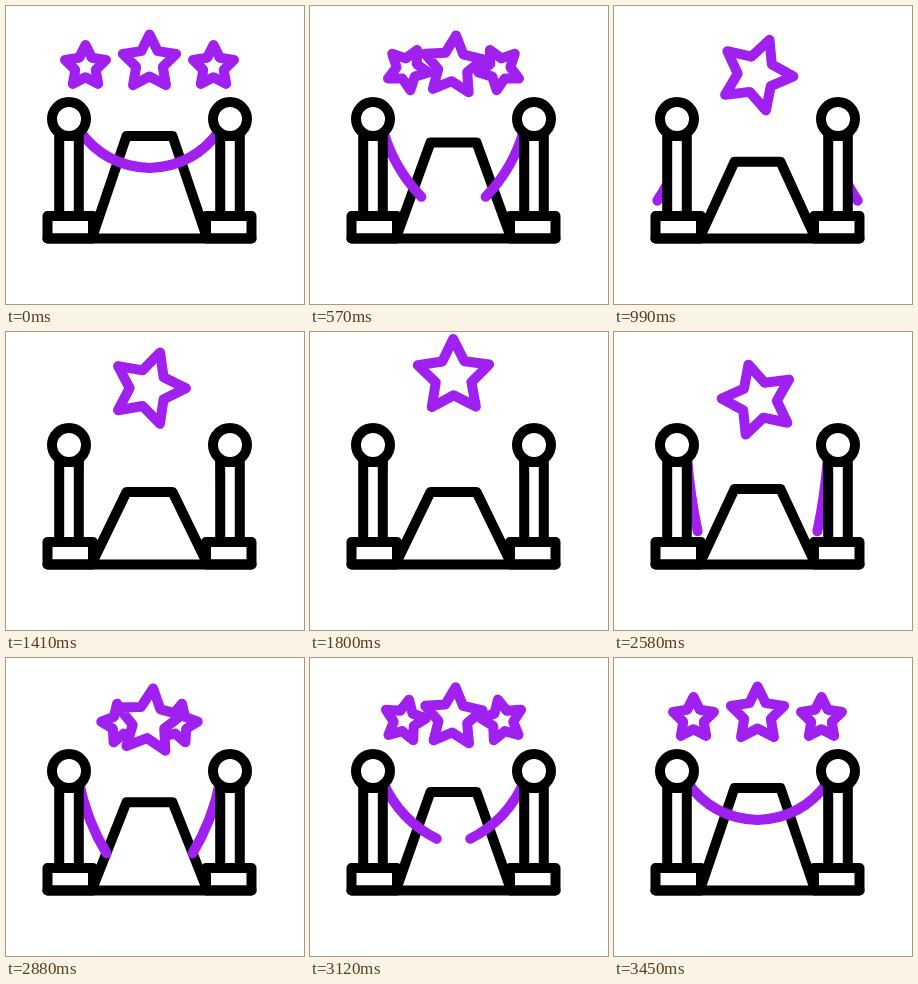
An HTML page with a canvas that plays this animation: 298 px wide and 298 px high, repeating every 3600 ms.

```html
<!DOCTYPE html>
<html lang="en">
<head>
<meta charset="utf-8">
<title>Red carpet icon</title>
<style>
html, body { margin: 0; width: 100%; height: 100%; overflow: hidden; background: #fff; }
canvas { display: block; width: 100vw; height: 100vh; }
</style>
</head>
<body>
<canvas id="stage" width="298" height="298"></canvas>
<script>
const SIZE = 298, LOOP = 3600, STEP = 30, MID = 143.5;
const BLACK = '#000', PURPLE = '#a020f0', WHITE = '#fff';
const ctx = document.getElementById('stage').getContext('2d');

// Each track is a list of [time, value], eased between neighbours.
const REST = 61.8;
const slide = [[300, 0], [1080, 1], [2400, 1], [3450, 0]];
const carpetTop = [[300, 130], [1200, 160], [2400, 160], [3330, 130]];
const tilt = [[300, 0], [1150, 23], [2430, -23], [2900, 7], [3450, 0]];
const swing = [[330, REST], [930, -29], [1200, 20], [1530, -12], [2150, 10], [2610, 8], [3450, REST]];

const rad = deg => deg * Math.PI / 180;
const ease = u => u * u * (3 - 2 * u);

function at(track, t) {
  if (t <= track[0][0]) return track[0][1];
  for (let i = 1; i < track.length; i++) {
    const [t0, v0] = track[i - 1], [t1, v1] = track[i];
    if (t < t1) return v0 + (v1 - v0) * ease((t - t0) / (t1 - t0));
  }
  return track[track.length - 1][1];
}

function paint(color, fill) {
  if (fill) {
    ctx.fillStyle = WHITE;
    ctx.fill();
  }
  ctx.strokeStyle = color;
  ctx.stroke();
}

function star(x, y, r, deg) {
  ctx.beginPath();
  for (let i = 0; i < 10; i++) {
    const a = rad(deg - 90 + i * 36), d = i % 2 ? r * 0.5 : r;
    ctx.lineTo(x + d * Math.cos(a), y + d * Math.sin(a));
  }
  ctx.closePath();
  paint(PURPLE, true);
}

function stars(t) {
  const p = at(slide, t), deg = at(tilt, t);
  const jump = t > 1200 && t < 2400 ? Math.sin(Math.PI * (t - 1200) / 1200) : 0;
  const y = 56.5 + 12.5 * p - 24.5 * jump;
  if (p < 0.98) {
    const r = 21.5 * (1 - 0.5 * p ** 4);
    for (const side of [-1, 1])
      star(MID + side * 64 * (1 - p), 60.5 + 9 * p, r, -side * 360 * p);
  }
  // The big star turns about a point slightly above its centre.
  star(MID - 3.5 * Math.sin(rad(deg)), y, 28 + 9.5 * p, deg);
}

function carpet(t) {
  const top = at(carpetTop, t);
  ctx.beginPath();
  ctx.moveTo(87, 229);
  ctx.lineTo(120.5, top);
  ctx.lineTo(166.5, top);
  ctx.lineTo(200, 229);
  paint(BLACK);
}

// Half of the rope: it bends more the further it swings from vertical.
function rope(t) {
  const deg = at(swing, t), k = deg / REST;
  const len = 76 + 4.5 * k * k;
  ctx.save();
  ctx.translate(73, 124);
  ctx.rotate(-rad(deg));
  ctx.beginPath();
  ctx.moveTo(0, 0);
  ctx.quadraticCurveTo(-20 * k, len / 2, 0, len);
  paint(PURPLE);
  ctx.restore();
}

function post() {
  ctx.beginPath();
  ctx.rect(53.2, 130, 19.6, 80);
  paint(BLACK, true);
  ctx.beginPath();
  ctx.arc(63, 113, 17, 0, 2 * Math.PI);
  paint(BLACK, true);
  ctx.beginPath();
  ctx.rect(41.5, 210, 45.5, 22.5);
  paint(BLACK, true);
}

function bothSides(draw, t) {
  draw(t);
  ctx.save();
  ctx.translate(2 * MID, 0);
  ctx.scale(-1, 1);
  draw(t);
  ctx.restore();
}

function render(t) {
  ctx.fillStyle = WHITE;
  ctx.fillRect(0, 0, SIZE, SIZE);
  ctx.lineWidth = 10;
  ctx.lineCap = ctx.lineJoin = 'round';
  carpet(t);
  bothSides(rope, t);
  bothSides(post, t);
  ctx.beginPath();
  ctx.moveTo(41.5, 232.5);
  ctx.lineTo(245.5, 232.5);
  paint(BLACK);
  stars(t);
}

const start = performance.now();
function frame() {
  const t = (performance.now() - start) % LOOP;
  render(Math.floor(t / STEP) * STEP);
  requestAnimationFrame(frame);
}
frame();
</script>
</body>
</html>
```
